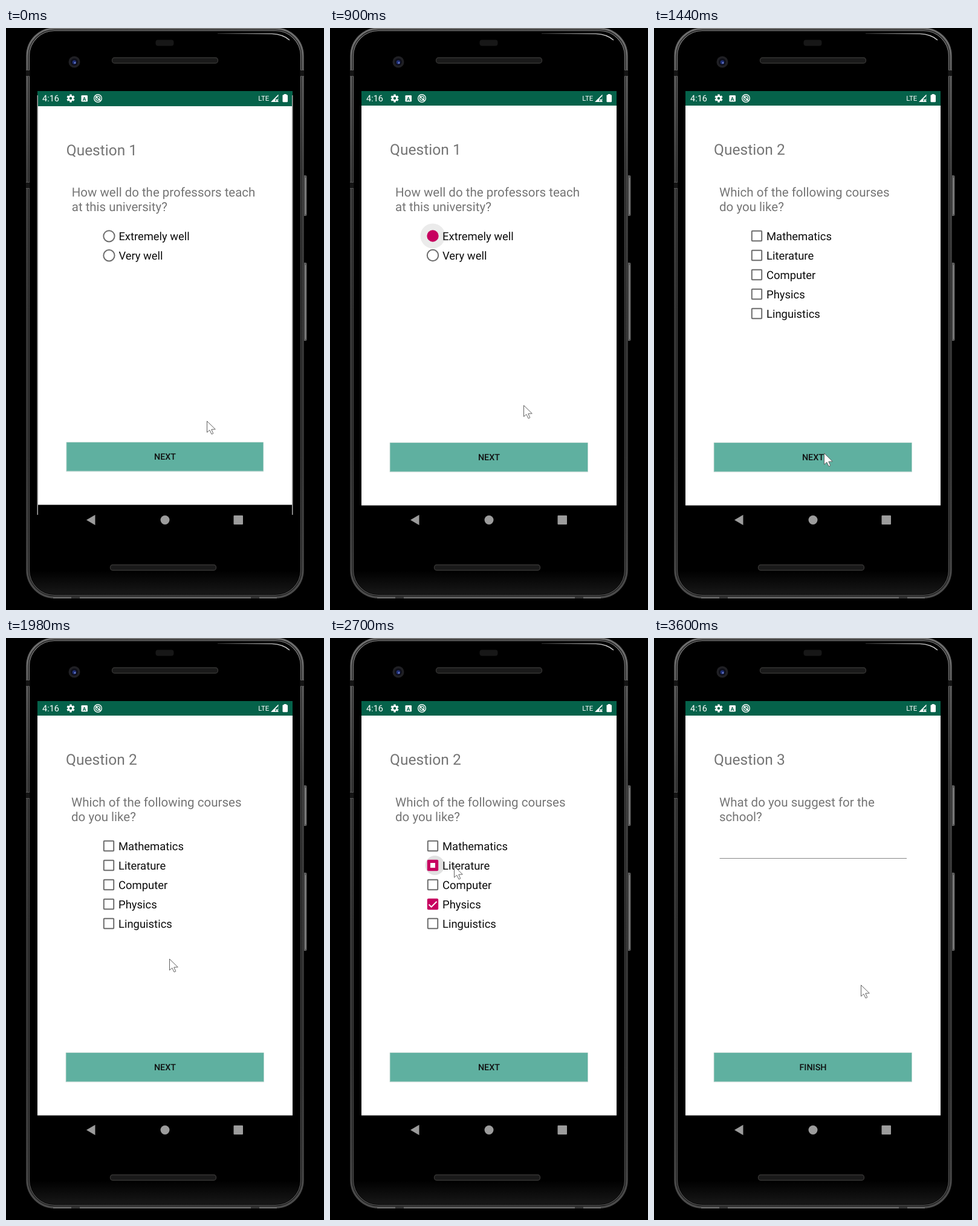
An HTML page with a canvas for the animation above (3.78 s loop, 526 px wide and 960 px high).

```html
<!DOCTYPE html>
<html lang="en">
<head>
<meta charset="utf-8">
<title>Survey app</title>
<style>
html, body { margin: 0; width: 100%; height: 100%; overflow: hidden; background: #000; }
canvas { display: block; }
</style>
</head>
<body>
<canvas id="stage" width="526" height="960"></canvas>
<script>
const ctx = document.getElementById('stage').getContext('2d');
ctx.textRendering = 'geometricPrecision';
const STEP = 180, LOOP = 3780;
const PINK = '#c70060', GREEN = '#05624a', GREY = '#757575';

// Pointer tip: [time, x, y], held until the next entry
const POINTER = [
  [0, 332, 648], [180, 283, 465], [360, 248, 389], [540, 225, 334],
  [900, 320, 622], [1080, 294, 706], [1260, 281, 701], [1980, 270, 529],
  [2160, 198, 440], [2520, 237, 396], [2700, 205, 376], [2880, 315, 681],
  [3060, 316, 691], [3420, 342, 581], [3600, 342, 572]
];

const PAGES = [
  { title: 'Question 1', text: ['How well do the professors teach', 'at this university?'],
    radios: ['Extremely well', 'Very well'], button: 'NEXT' },
  { title: 'Question 2', text: ['Which of the following courses', 'do you like?'],
    checks: ['Mathematics', 'Literature', 'Computer', 'Physics', 'Linguistics'], button: 'NEXT' },
  { title: 'Question 3', text: ['What do you suggest for the', 'school?'], button: 'FINISH' }
];

function rect(x, y, w, h, color) {
  ctx.fillStyle = color;
  ctx.fillRect(x, y, w, h);
}

function pill(x, y, w, h, r, fill, stroke, width = 1) {
  ctx.beginPath();
  ctx.roundRect(x, y, w, h, r);
  paint(fill, stroke, width);
}

function disc(x, y, r, fill, stroke, width = 1) {
  ctx.beginPath();
  ctx.arc(x, y, r, 0, Math.PI * 2);
  paint(fill, stroke, width);
}

function poly(points, fill, stroke, width = 1) {
  ctx.beginPath();
  points.forEach(([x, y]) => ctx.lineTo(x, y));
  ctx.closePath();
  paint(fill, stroke, width);
}

function line(x1, y1, x2, y2, color, width = 1) {
  ctx.beginPath();
  ctx.moveTo(x1, y1);
  ctx.lineTo(x2, y2);
  paint(null, color, width);
}

function paint(fill, stroke, width) {
  if (fill) { ctx.fillStyle = fill; ctx.fill(); }
  if (stroke) { ctx.strokeStyle = stroke; ctx.lineWidth = width; ctx.stroke(); }
}

function fade(x1, y1, x2, y2, ...colors) {
  const g = ctx.createLinearGradient(x1, y1, x2, y2);
  colors.forEach((c, i) => g.addColorStop(i / (colors.length - 1), c));
  return g;
}

function label(text, x, y, size, color, weight = 400, align = 'left') {
  ctx.font = `${weight} ${size}px Roboto, sans-serif`;
  ctx.textAlign = align;
  ctx.fillStyle = color;
  ctx.fillText(text, x, y);
}

// Rounded outline of the phone, moved inwards
function shell(inset, fill, stroke, width) {
  pill(33 + inset, inset - 1, 460 - 2 * inset, 942 - 2 * inset, 47 - inset, fill, stroke, width);
}

function drawPhone() {
  rect(0, 0, 526, 960, '#000');
  // Side keys
  for (const [y, h] of [[243, 67], [387, 129]]) {
    pill(491, y, 6.5, h, 2, '#5c5c5c');
    line(495.5, y + 4, 495.5, y + h - 3, '#969696');
  }
  // Metal rim and glass
  shell(0, '#1d1d1d');
  shell(2, null, fade(0, 0, 0, 940, '#707070', '#444', '#3a3a3a', '#3a3a3a', '#4c4c4c'), 3);
  shell(5.5, '#000', fade(0, 0, 0, 940, '#8a8a8a', '#555', '#484848', '#484848', '#5a5a5a'), 1.2);
  pill(40, 895, 446, 39, [0, 0, 40, 40], fade(0, 895, 0, 936, '#000', '#191919'));
  line(78, 940, 448, 940, '#777', 1.5);
  // Corner highlight
  ctx.beginPath();
  ctx.moveTo(350, 9);
  ctx.lineTo(440, 9.5);
  ctx.quadraticCurveTo(459, 10.5, 469, 20);
  paint(null, fade(350, 0, 465, 0, '#222', '#777', '#ccc'), 1.5);
  // Antenna bands
  for (const [x, y] of [[33, 69], [33, 254], [487, 69]]) {
    rect(x, y, 6, 10, '#141414');
    rect(x, y, 6, 1, '#555');
    rect(x, y + 10, 6, 1, '#555');
  }
  rect(108, 938, 14, 3, '#333');
  rect(405, 938, 14, 3, '#333');
  // Speakers, sensor, camera
  pill(247.5, 19.5, 30, 10, 4, '#171717');
  pill(175.5, 49, 175, 9, 4, '#1a1a1a', '#353433', 1.3);
  pill(172.5, 885.5, 175, 9, 4, '#1a1a1a', '#353433', 1.3);
  disc(113, 56, 9.5, '#202024');
  disc(113, 56, 6, '#0e0f1a');
  disc(113, 56.5, 3.2, '#203078');
  disc(114, 57.5, 1.2, '#8090d8');
  // Navigation
  poly([[133, 811.5], [147.5, 803], [147.5, 820]], '#9c9c9c');
  disc(263, 811.5, 7.5, '#9c9c9c');
  pill(376.5, 804, 15.5, 15, 1, '#9c9c9c');
}

function drawStatusBar() {
  rect(52, 104, 422, 25, GREEN);
  label('4:16', 60, 121.4, 14.5, '#fff');
  // Gear
  for (let i = 0; i < 6; i++) {
    const a = Math.PI / 6 + i * Math.PI / 3;
    line(107, 116, 107 + 6.6 * Math.cos(a), 116 + 6.6 * Math.sin(a), '#fff', 3.4);
  }
  disc(107, 116, 4.8, '#fff');
  disc(107, 116, 2.2, GREEN);
  // Keyboard
  pill(124.5, 111, 10.5, 10.5, 1.2, '#fff');
  label('A', 129.7, 119.5, 8.5, GREEN, 700, 'center');
  // Ring
  disc(152, 116, 6.3, null, '#fff', 1.4);
  disc(152, 116, 3.4, null, '#fff', 1.4);
  line(148.5, 112.5, 156, 120, '#fff', 1.5);
  // Signal and battery
  label('LTE', 417.3, 120, 11.4, '#fff');
  poly([[438, 122], [450.5, 122], [450.5, 109.5]], '#fff');
  poly([[445.5, 121], [450.5, 121], [450.5, 112], [445.5, 117]], GREEN);
  line(446.5, 117.5, 450, 121.5, '#fff', 1.2);
  line(450, 117.5, 446.5, 121.5, '#fff', 1.2);
  pill(457.5, 110.3, 8.5, 12, 1.2, '#fff');
  rect(459.8, 109, 4, 2, '#fff');
}

function drawRadio(y, t, isFirst) {
  if (!isFirst || t < 900) {
    if (isFirst && t >= 720) disc(170, y, 10, '#ececec');
    disc(170, y, 9.2, null, '#6d6d6d', 2);
  } else if (t < 1080) {
    disc(170, y, 20.5, '#ebebeb');
    disc(170, y, 9.7, PINK);
  } else {
    disc(170, y, 9.2, null, PINK, 2);
    disc(170, y, 5, PINK);
  }
}

function drawCheck(y, age) {
  if (age < 0) {
    pill(161.8, y - 8.2, 16.4, 16.4, 1, null, '#6d6d6d', 2);
    return;
  }
  if (age < STEP) disc(173.5, y, 16, '#e1e1e1');
  pill(160.8, y - 9.2, 18.4, 18.4, 2, PINK);
  if (age < STEP) {
    rect(166, y - 4, 8, 8, '#fff');
  } else {
    ctx.beginPath();
    ctx.moveTo(163.5, y + 0.5);
    ctx.lineTo(167.7, y + 4.7);
    ctx.lineTo(176.5, y - 4.3);
    paint(null, '#fff', 2);
  }
}

function drawPage(page, t) {
  rect(52, 128, 422, 659.5, '#fff');
  label(page.title, 99, 209.3, 24.6, GREY);
  page.text.forEach((s, i) => label(s, 108, 277.8 + i * 24, 20.55, GREY));

  (page.radios || []).forEach((s, i) => {
    const y = 343 + i * 32;
    drawRadio(y, t, i === 0);
    label(s, 186, y + 7, 18.45, '#0c0c0c');
  });

  const checkedAt = { Literature: 2700, Physics: 2340 };
  (page.checks || []).forEach((s, i) => {
    const y = 343 + i * 32;
    drawCheck(y, s in checkedAt ? t - checkedAt[s] : -1);
    label(s, 186, y + 7, 18.45, '#0c0c0c');
  });

  if (page === PAGES[2]) rect(108.5, 363, 309.5, 1, '#868686');

  pill(98.5, 683.5, 328.5, 49.5, 1, '#dfe6e4');
  rect(99, 684, 327.5, 48, '#8fc6ba');
  rect(100, 684.5, 326, 46.5, '#5fb0a0');
  label(page.button, 263, 713, 14.4, '#101010', 500, 'center');
}

function drawPointer(t) {
  const [, x, y] = POINTER.findLast(p => p[0] <= t);
  const shape = [[0, 0], [0, 18.5], [4.3, 14.7], [7.6, 21.5], [10.3, 20.3], [7.3, 13.7], [13.8, 13.4]];
  poly(shape.map(([dx, dy]) => [x + 0.5 + dx, y + 0.5 + dy]), '#fff', '#606060');
}

function draw(t) {
  drawPhone();
  drawStatusBar();
  ctx.save();
  if (t < STEP) {
    // The first page is still settling into place
    rect(51.5, 111, 1.5, 692, '#aaa');
    rect(473, 111, 1.5, 692, '#aaa');
    ctx.translate(263, 457);
    ctx.scale(0.995, 0.997);
    ctx.translate(-263, -457);
  }
  if (t === 3240) {
    // The last page slides up its final pixels
    rect(52, 128, 422, 659.5, '#fff');
    ctx.beginPath();
    ctx.rect(52, 128, 422, 659.5);
    ctx.clip();
    ctx.translate(0, 4);
  }
  drawPage(PAGES[t < 1440 ? 0 : t < 3240 ? 1 : 2], t);
  ctx.restore();
  drawPointer(t);
}

function tick() {
  const t = performance.now() % LOOP;
  draw(Math.floor(t / STEP) * STEP);
  requestAnimationFrame(tick);
}
tick();
</script>
</body>
</html>
```
